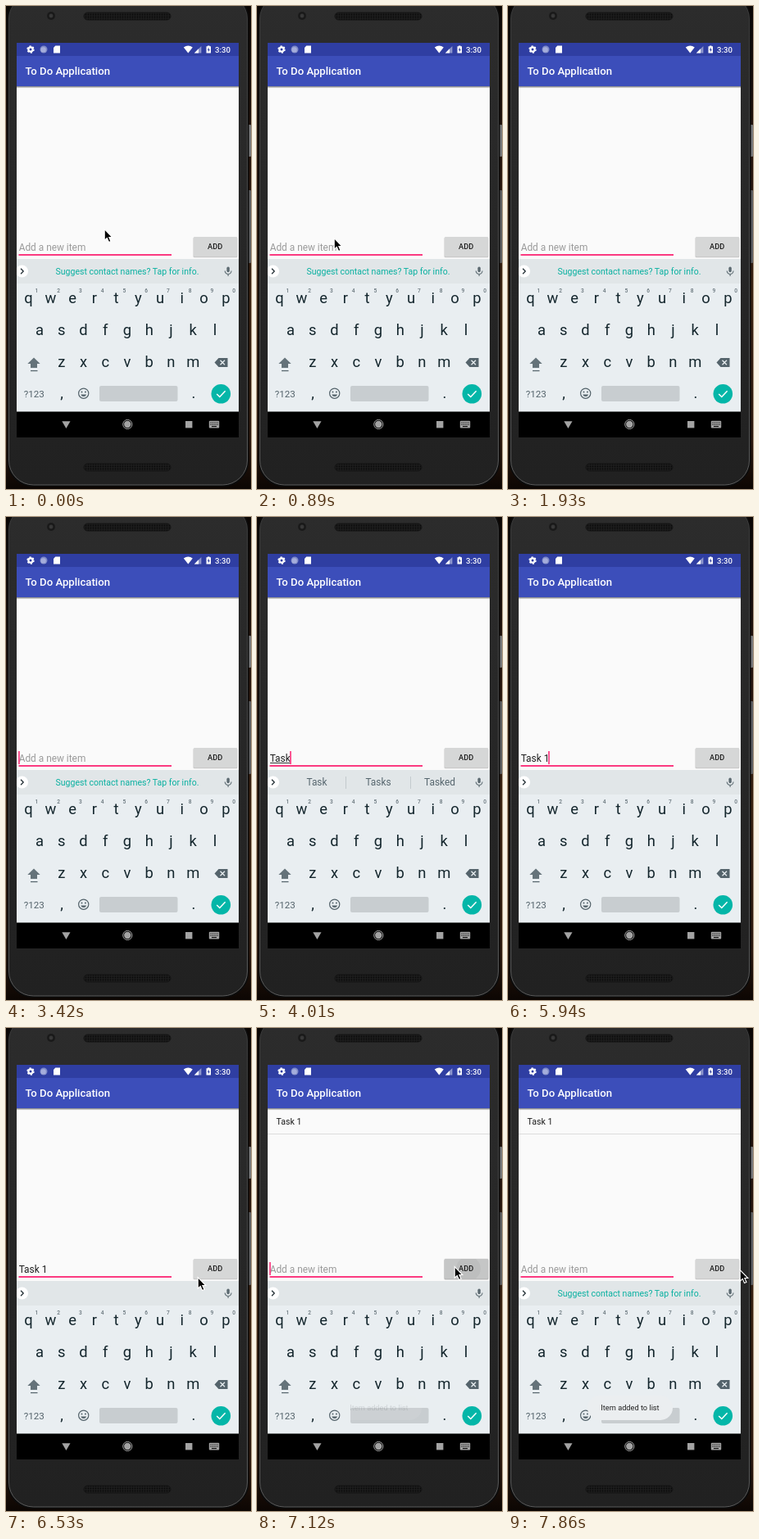
An HTML page that plays this animation: 299 px wide and 590 px high, repeating every 8000 ms.

```html
<!DOCTYPE html>
<html lang="en">
<head>
<meta charset="utf-8">
<title>To Do Application</title>
<style>
html, body { margin: 0; width: 100%; height: 100%; overflow: hidden; background: #000; }
svg { display: block; width: 299px; height: 590px; font-family: Roboto, "Noto Sans", sans-serif; }
.m { text-anchor: middle; }
.key { font-size: 18.4px; fill: #14262d; text-anchor: middle; }
.num { font-size: 6.6px; font-weight: 500; fill: #66737a; text-anchor: middle; }
.edit { font-size: 11.86px; fill: #1c1c1c; white-space: pre; }
.hint { fill: #9a9a9a; }
.word { font-size: 11.86px; fill: #55656d; text-anchor: middle; }
.offer { font-size: 10.54px; fill: #08b0a0; text-anchor: middle; }

/* 1% = 80 ms */
.a { animation: 8s step-end infinite; }
#hint { animation-name: hint; }
#offer { animation-name: offer; }
#s1 { animation-name: s1; }
#s2 { animation-name: s2; }
#s3 { animation-name: s3; }
#s4 { animation-name: s4; }
#s5 { animation-name: s5; }
#s6 { animation-name: s6; }
#bars { animation-name: bars; }
#item { animation-name: item; }
#press { animation-name: press; }
#toast { animation-name: toast; }
#caret { animation-name: caret; }
#mouse { animation-name: mouse; }

@keyframes hint { 0% { opacity: 1 } 44.625% { opacity: 0 } 89%, 100% { opacity: 1 } }
@keyframes offer { 0% { opacity: 1 } 44.625% { opacity: 0 } 92.75%, 100% { opacity: 1 } }
@keyframes s1 { 0% { opacity: 0 } 44.625% { opacity: 1 } 46.5%, 100% { opacity: 0 } }
@keyframes s2 { 0% { opacity: 0 } 46.5% { opacity: 1 } 48.25%, 100% { opacity: 0 } }
@keyframes s3 { 0% { opacity: 0 } 48.25% { opacity: 1 } 50.125%, 100% { opacity: 0 } }
@keyframes s4 { 0% { opacity: 0 } 50.125% { opacity: 1 } 53.875%, 100% { opacity: 0 } }
@keyframes s5 { 0% { opacity: 0 } 53.875% { opacity: 1 } 61.25%, 100% { opacity: 0 } }
@keyframes s6 { 0% { opacity: 0 } 61.25% { opacity: 1 } 89%, 100% { opacity: 0 } }
@keyframes bars { 0% { opacity: 0 } 44.625% { opacity: 1 } 61.25%, 100% { opacity: 0 } }
@keyframes item { 0% { opacity: 0 } 89%, 100% { opacity: 1 } }
@keyframes press {
  0% { opacity: 0 } 87.125% { opacity: .5 } 89% { opacity: 1 }
  90.875% { opacity: .6 } 92.75% { opacity: .25 } 94.625%, 100% { opacity: 0 }
}
@keyframes toast {
  0% { opacity: 0 } 89% { opacity: .12 } 90.875% { opacity: .65 } 92.75%, 100% { opacity: 1 }
}
@keyframes caret {
  0% { opacity: 0; transform: none }
  5.5% { opacity: 1 } 11.125% { opacity: 0 }
  16.625% { opacity: 1 } 24.125% { opacity: 0 }
  29.75% { opacity: 1 } 35.375% { opacity: 0 }
  42.75% { opacity: 1; transform: none }
  44.625% { opacity: 1; transform: translateX(7px) }
  46.5% { opacity: 1; transform: translateX(13px) }
  48.25% { opacity: 1; transform: translateX(19px) }
  50.125% { opacity: 1; transform: translateX(25px) }
  53.875% { opacity: 1; transform: translateX(28px) }
  61.25% { opacity: 1; transform: translateX(34px) }
  68.75% { opacity: 0; transform: translateX(34px) }
  74.25% { opacity: 1; transform: translateX(34px) }
  79.875% { opacity: 0; transform: translateX(34px) }
  85.375% { opacity: 1; transform: translateX(34px) }
  89% { opacity: 1; transform: none }
  94.625%, 100% { opacity: 0; transform: none }
}
@keyframes mouse {
  0% { opacity: 1; transform: translate(120px, 272px) }
  1.75% { opacity: 1; transform: translate(116px, 274px) }
  3.625% { opacity: 1; transform: translate(106px, 279px) }
  5.5% { opacity: 1; transform: translate(97px, 282px) }
  7.375% { opacity: 1; transform: translate(94px, 283px) }
  14.875% { opacity: 1; transform: translate(148px, 258px) }
  16.625% { opacity: 0; transform: translate(148px, 258px) }
  76.125% { opacity: 1; transform: translate(206px, 358px) }
  78% { opacity: 1; transform: translate(215px, 340px) }
  79.875% { opacity: 1; transform: translate(225px, 320px) }
  81.625% { opacity: 1; transform: translate(234px, 304px) }
  83.5% { opacity: 1; transform: translate(239px, 295px) }
  85.375% { opacity: 1; transform: translate(241px, 291px) }
  98.25%, 100% { opacity: 1; transform: translate(283px, 295px) }
}
</style>
</head>
<body>
<svg viewBox="0 0 299 590">
  <defs>
    <linearGradient id="room" x2="0" y2="1">
      <stop offset="0" stop-color="#0a0604"/><stop offset=".3" stop-color="#24130b"/>
      <stop offset=".6" stop-color="#38200f"/><stop offset=".9" stop-color="#2a170c"/><stop offset="1" stop-color="#0c0603"/>
    </linearGradient>
    <linearGradient id="body" x2="0" y2="1">
      <stop offset="0" stop-color="#2c2c2c"/><stop offset="1" stop-color="#212121"/>
    </linearGradient>
    <linearGradient id="rim" x2="0" y2="1">
      <stop offset="0" stop-color="#3a3a3a"/><stop offset="1" stop-color="#5a5a5a"/>
    </linearGradient>
    <linearGradient id="drop" x2="0" y2="1">
      <stop offset="0" stop-opacity=".5"/><stop offset="1" stop-opacity="0"/>
    </linearGradient>
    <pattern id="mesh" width="3" height="3" patternUnits="userSpaceOnUse">
      <rect width="3" height="3" fill="#1c1c1c"/><circle cx="1.5" cy="1.5" r=".9" fill="#0a0a0a"/>
    </pattern>
    <clipPath id="screen"><rect x="13" y="45" width="271" height="482"/></clipPath>
    <clipPath id="btn"><rect x="229" y="282" width="53" height="24" rx="1.3"/></clipPath>
  </defs>

  <!-- phone -->
  <rect width="299" height="590" fill="url(#room)"/>
  <rect x="294" y="145" width="5" height="39" rx="1" fill="#77787a"/>
  <rect x="294" y="225" width="5" height="89" rx="1" fill="#5d5e60"/>
  <rect x="1.5" y="-16" width="295" height="603" rx="31" fill="#0c0c0c"/>
  <rect x="3.5" y="-14" width="291" height="599" rx="30" fill="url(#body)" stroke="url(#rim)"/>
  <rect x="6" y="-10" width="286.5" height="591" rx="27" fill="url(#body)"/>
  <circle cx="55" cy="12" r="5" fill="#1a1a1a"/><circle cx="55" cy="12" r="2.4" fill="#383838"/>
  <rect x="95" y="8" width="106" height="9" rx="4.5" fill="url(#mesh)" stroke="#151515"/>
  <rect x="95" y="559" width="106" height="9" rx="4.5" fill="url(#mesh)" stroke="#151515"/>

  <g clip-path="url(#screen)">
    <rect x="13" y="45" width="271" height="482" fill="#fafafa"/>
    <rect x="13" y="45" width="271" height="16.5" fill="#2f3ea2"/>
    <rect x="13" y="61" width="271" height="37" fill="#3c4eba"/>
    <rect x="13" y="98" width="271" height="2.6" fill="url(#drop)"/>

    <!-- status bar -->
    <g fill="#fff">
      <circle cx="30" cy="53" r="2.6" fill="none" stroke="#fff" stroke-width="2.2"/>
      <circle cx="30" cy="53" r="4" fill="none" stroke="#fff" stroke-width="1.4" stroke-dasharray="2.1 2.1"/>
      <circle cx="46" cy="53" r="4.5" fill="#7f8ac8"/>
      <circle cx="45.6" cy="53.4" r="3.2" fill="#a5addb"/>
      <path d="M60.3 48.5H66V57.5H58V51z"/>
      <path d="M216.8 50.4Q222.3 46.8 227.8 50.4L222.3 57.5z"/>
      <path d="M238.4 49V57.5H229.8z" opacity=".45"/><path d="M235 52.3V57.5H229.8z"/>
      <path d="M246 48.5H248.5V49.3H250V57.5H244.5V49.3H246z"/>
      <path d="M247.7 50.5L245.8 53.8H247V56.2L248.8 52.9H247.7z" fill="#303f9f"/>
      <text x="255" y="56.8" font-size="9.6" font-weight="500">3:30</text>
      <text x="23.6" y="84.3" font-size="13.18" font-weight="500">To Do Application</text>
    </g>

    <g id="item" class="a">
      <text x="23.6" y="117.8" font-size="10.54" fill="#1c1c1c">Task 1</text>
      <path d="M13 129.5H284" stroke="#dcdcdc"/>
    </g>

    <!-- input row -->
    <path d="M15.5 304H202" stroke="#fb3a80" stroke-width="2"/>
    <rect x="228.5" y="282.5" width="54" height="24.8" rx="1.5" opacity=".2"/>
    <rect x="229" y="282" width="53" height="24" rx="1.3" fill="#d6d7d7"/>
    <g id="press" class="a">
      <rect x="228" y="281.5" width="55" height="26.5" rx="2" opacity=".08"/>
      <circle cx="258" cy="294" r="15" opacity=".04" clip-path="url(#btn)"/>
    </g>
    <text class="m" x="255.2" y="297.3" font-size="9.22" font-weight="500" fill="#1c1c1c">ADD</text>

    <!-- keyboard -->
    <rect x="13" y="309" width="271" height="30" fill="#e1e6e8"/>
    <rect x="13" y="339" width="271" height="157" fill="#e9eef1"/>
    <circle cx="19.5" cy="324" r="7.6" fill="#fff"/>
    <path d="M18 320.8L21.2 324L18 327.2" fill="none" stroke="#263238" stroke-width="1.3"/>
    <g stroke="#5c6a71" fill="none" stroke-width="1.1">
      <rect x="269.4" y="318.6" width="3.4" height="6.6" rx="1.7" fill="#5c6a71" stroke="none"/>
      <path d="M267.2 323.6a3.9 3.9 0 0 0 7.8 0M271.1 327.4V330"/>
    </g>
    <path id="bars" class="a" d="M108.5 317V332M187.5 317V332" stroke="#c3cacd"/>

    <text id="hint" class="a edit hint" x="15.7" y="298.8">Add a new item</text>
    <text id="offer" class="a offer" x="148" y="328">Suggest contact names? Tap for info.</text>
    <g id="s1" class="a">
      <text class="edit" x="15.7" y="298.8">T</text><path d="M16 300.5H22.5" stroke="#333"/>
      <text class="word" x="73" y="328.3">T</text><text class="word" x="148" y="328.3">The</text><text class="word" x="223" y="328.3">This</text>
    </g>
    <g id="s2" class="a">
      <text class="edit" x="15.7" y="298.8">Ta</text><path d="M16 300.5H28.5" stroke="#333"/>
      <text class="word" x="73" y="328.3">Ta</text><text class="word" x="148" y="328.3">Take</text><text class="word" x="223" y="328.3">Talk</text>
    </g>
    <g id="s3" class="a">
      <text class="edit" x="15.7" y="298.8">Tas</text><path d="M16 300.5H34.5" stroke="#333"/>
      <text class="word" x="73" y="328.3">Tas</text><text class="word" x="148" y="328.3">Task</text><text class="word" x="223" y="328.3">Taste</text>
    </g>
    <g id="s4" class="a">
      <text class="edit" x="15.7" y="298.8">Task</text><path d="M16 300.5H40.5" stroke="#333"/>
      <text class="word" x="73" y="328.3">Task</text><text class="word" x="148" y="328.3">Tasks</text><text class="word" x="223" y="328.3">Tasked</text>
    </g>
    <g id="s5" class="a">
      <text class="edit" x="15.7" y="298.8">Task</text>
      <text class="word" x="73" y="328.3">is</text><text class="word" x="148" y="328.3">and</text><text class="word" x="223" y="328.3">for</text>
    </g>
    <text id="s6" class="a edit" x="15.7" y="298.8">Task 1</text>
    <rect id="caret" class="a" x="15.1" y="286" width="1.7" height="16" fill="#fb3a80"/>

    <g id="keys"></g>
    <g fill="#54636b">
      <path d="M34 429.5L41.7 437H38V442H30V437H26.3z" fill="#65737a"/><rect x="30" y="445" width="8.5" height="1.2"/>
      <path d="M259.5 430H270.5V441H259.5L254.5 435.5z"/>
      <path d="M261.5 432.8L267 438.2M267 432.8L261.5 438.2" stroke="#e9eef1" stroke-width="1.3"/>
      <text class="m" x="34.3" y="477.6" font-size="11.6">?123</text>
      <circle cx="94.7" cy="473.2" r="6.1" fill="none" stroke="#54636b" stroke-width="1.2"/>
      <circle cx="92.5" cy="471.5" r="1"/><circle cx="96.9" cy="471.5" r="1"/>
      <path d="M91.3 474.6H98.1A3.5 3.3 0 0 1 91.3 474.6z"/>
    </g>
    <rect x="114" y="464" width="95.5" height="19" rx="2" fill="#c8cdd0"/>
    <circle cx="262.3" cy="473.8" r="11.8" fill="#04b6a8"/>
    <path d="M257.2 474L260.8 477.5L267.6 470.3" fill="none" stroke="#fff" stroke-width="1.5"/>

    <g id="toast" class="a">
      <rect x="97" y="449" width="104" height="30" rx="15" fill="#ebeef0"/>
      <text class="m" x="149" y="467.2" font-size="9.22" fill="#222">Item added to list</text>
    </g>

    <!-- navigation -->
    <rect x="13" y="495.5" width="271" height="32"/>
    <g fill="#a3a3a3">
      <path d="M68.3 507.2H78.5L73.4 516z"/>
      <circle cx="148.3" cy="511" r="5.6" fill="none" stroke="#a3a3a3"/><circle cx="148.3" cy="511" r="4.2"/>
      <rect x="219" y="507" width="8.4" height="8.4"/>
      <rect x="247.8" y="506.8" width="12.4" height="8.6" rx="1"/>
      <path d="M249.3 509H259M249.3 511.2H259" stroke="#000" stroke-width="1.1" stroke-dasharray="1.1 1"/>
      <path d="M251 513.6H257" stroke="#000"/>
    </g>
  </g>

  <path id="mouse" class="a" d="M.2 .6V14.2L3.3 11.4L5.5 16.5L8 15.5L5.8 10.5H9.8z" fill="#000" stroke="#fff" stroke-width="1.1"/>
</svg>
<script>
const keys = document.getElementById('keys');
const pitch = 26.75;
const label = (cls, x, y, s) => `<text class="${cls}" x="${x}" y="${y}">${s}</text>`;
const row = (cls, chars, x, y) =>
  [...chars].map((c, i) => label(cls, x + i * pitch, y, c)).join('');
keys.innerHTML =
  row('key', 'qwertyuiop', 27.6, 363) + row('key', 'asdfghjkl', 41, 402) +
  row('key', 'zxcvbnm', 67.7, 441) + row('num', '1234567890', 37.4, 350) +
  label('key', 68, 479, ',') + label('key', 229, 479, '.');
</script>
</body>
</html>
```
